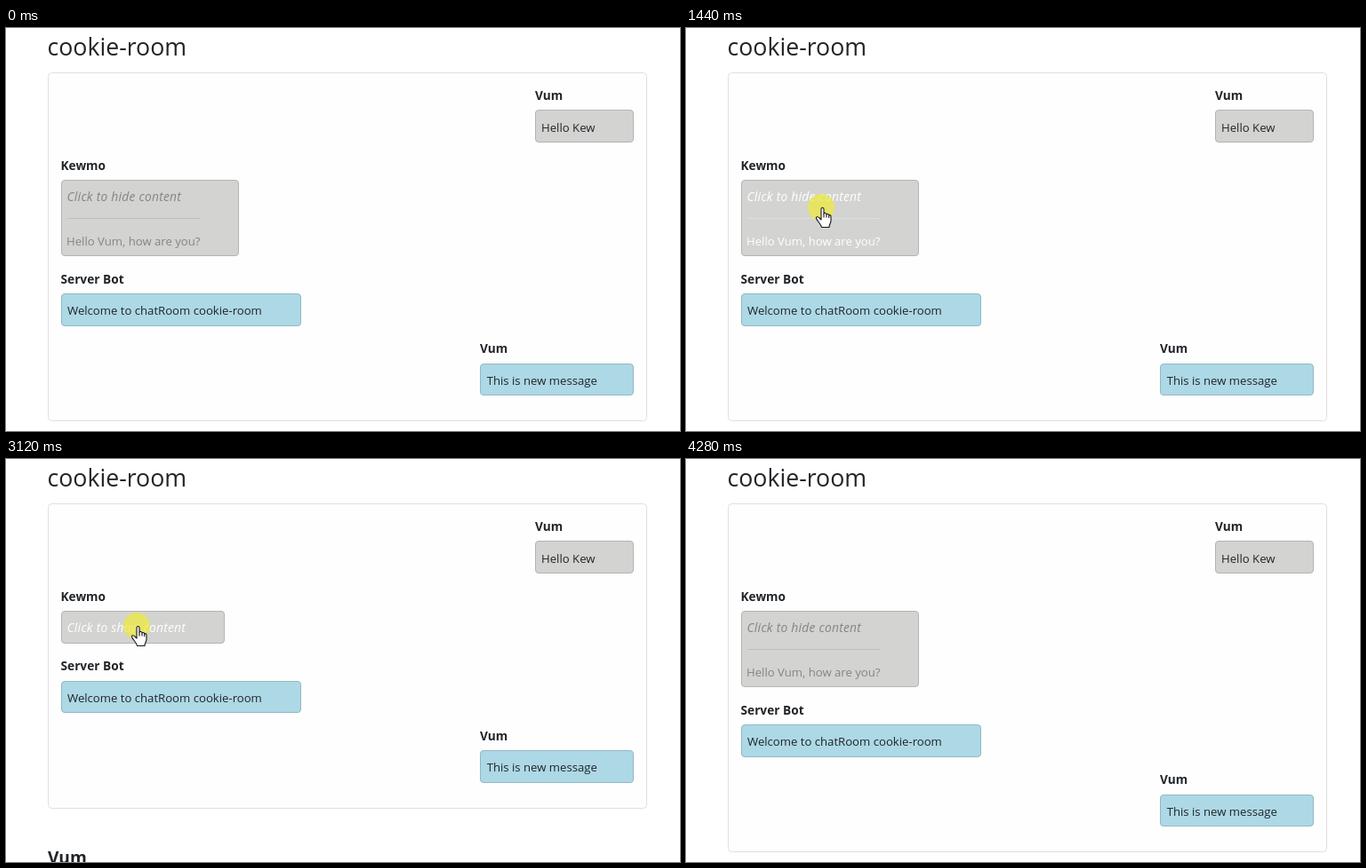
An HTML page with a canvas that plays this animation: 758 by 454 pixels, repeating every 5090 ms.

```html
<!DOCTYPE html>
<html lang="en">
<head>
<meta charset="utf-8">
<title>cookie-room</title>
<style>
  html, body { margin: 0; width: 100%; height: 100%; overflow: hidden; background: #fff; }
  canvas { display: block; }
</style>
</head>
<body>
<canvas id="stage" width="758" height="454"></canvas>
<script>
const ctx = document.getElementById('stage').getContext('2d');
const LOOP = 5090;
const FAMILY = '"Open Sans", "Noto Sans", sans-serif';
const BODY = `13.15px ${FAMILY}`;
const BOLD = `bold 13.7px ${FAMILY}`;
const ITALIC = `italic 13.8px ${FAMILY}`;
const INK = '#212529';
const GRAY = ['#d3d3d1', '#b4b4b3'];
const BLUE = ['#add8e6', '#93b8c4'];

const arrow = new Path2D('M.5 .5V16.8L4.2 13.3L6.8 19L9.2 18L6.7 12.2H11.6Z');
const hand = new Path2D('M0 2C0 0 3 0 3 2V7C3.5 6 6 6.2 6 8C6.5 7 8.5 7.5 8.7 9' +
  'C9.5 8.2 11 8.8 11 10.5V15C11 18 9 19 9 22.5H.5C0 19 -4 16 -5.5 12.5' +
  'C-6 10.5 -3.5 10 -2 12L0 14Z');
const knuckles = new Path2D('M3 7V11.5M6 8V11.5M8.7 9V12');

const between = (t, a, b) => t >= a && t < b;
const mix = (a, b, p) => a + (b - a) * p;

function text(str, x, y, font, color = INK, spacing = 0) {
  ctx.font = font;
  ctx.letterSpacing = spacing + 'px';
  ctx.fillStyle = color;
  ctx.fillText(str, x, Math.round(y));
}

function box(left, top, right, bottom, [fill, line], radius = 3.5) {
  const y = Math.round(top);
  ctx.beginPath();
  ctx.roundRect(left + .5, y + .5, right - left - 1, Math.round(bottom) - y - 1, radius);
  ctx.fillStyle = fill;
  ctx.fill();
  ctx.lineWidth = 1;
  ctx.strokeStyle = line;
  ctx.stroke();
}

// Progress from 0 to 1, held for each step of the pointer.
function progress(t, start, end, steps) {
  return Math.min(1, Math.floor((t - start) / (end - start) * steps + 1e-6) / steps);
}

function pointer(t) {
  if (!between(t, 750, 4280)) return null;
  if (t < 2510) {
    const p = 1 - (1 - progress(t, 750, 1190, 11)) ** 1.7;
    return [mix(144, 152, p), mix(440, 202, p)];
  }
  if (t < 2870) {
    const p = (1 + progress(t, 2510, 2570, 2) * 2) / 3;
    return [mix(152, 148, p), mix(202, 189, p)];
  }
  if (t < 3810) return [147, 188];
  const p = progress(t, 3810, 4280, 15) ** 1.6;
  return [mix(149, 795, p), mix(188, 475, p)];
}

function drawPointer([x, y], isHand) {
  ctx.save();
  ctx.translate(Math.round(x), Math.round(y));
  const shape = isHand ? hand : arrow;
  ctx.lineJoin = 'round';
  ctx.fillStyle = '#fff';
  ctx.strokeStyle = '#15151c';
  ctx.lineWidth = 1.1;
  ctx.fill(shape);
  ctx.stroke(shape);
  if (isHand) ctx.stroke(knuckles);
  ctx.restore();
}

function draw(t) {
  const closed = between(t, 1540, 3220);
  const shift = closed ? -49.4 : 0;
  const tip = pointer(t);
  const hover = tip && between(tip[0], 69, closed ? 204 : 219) &&
    between(tip[1], 180, closed ? 201 : 250);

  ctx.fillStyle = '#fff';
  ctx.fillRect(0, 0, 758, 454);
  text('cookie-room', 46.5, 31, `26.7px ${FAMILY}`);
  box(47, 50, 721, 442.9 + shift, ['#fefefe', '#dfdfdf'], 4);

  text('Vum', 595, 81, BOLD);
  box(595, 92, 706, 129, GRAY);
  text('Hello Kew', 602, 117, BODY);

  text('Kewmo', 61.5, 160, BOLD);
  box(62, 171, closed ? 246 : 262, closed ? 208 : 257, GRAY);
  const color = hover ? '#fff' : closed ? '#788a90' : '#828684';
  text(`Click to ${closed ? 'show' : 'hide'} content`, 68.5, 195, ITALIC, color, .27);
  if (!closed) {
    ctx.fillStyle = hover ? '#dededd' : '#bebebd';
    ctx.fillRect(69, 214, 150, 1);
    text('Hello Vum, how are you?', 68, 245, BODY, color);
  }

  text('Server Bot', 61.5, 287.6 + shift, BOLD);
  box(62, 299.1 + shift, 332, 335.6 + shift, BLUE);
  text('Welcome to chatRoom cookie-room', 69, 323.2 + shift, BODY);

  text('Vum', 533, 366.2 + shift, BOLD);
  box(533, 377.7 + shift, 706, 414.2 + shift, BLUE);
  text('This is new message', 540.7, 401.6 + shift, BODY);

  if (closed) text('Vum', 47, 456, `bold 19.2px ${FAMILY}`);

  if (between(t, 1440, 1540) || between(t, 3120, 3220)) {
    ctx.beginPath();
    ctx.arc(tip[0], tip[1], 15, 0, Math.PI * 2);
    ctx.fillStyle = 'rgba(236, 233, 66, .76)';
    ctx.fill();
  }
  if (tip) drawPointer(tip, hover);
}

const start = performance.now();
function tick() {
  draw((performance.now() - start) % LOOP);
  requestAnimationFrame(tick);
}
tick();
</script>
</body>
</html>
```
